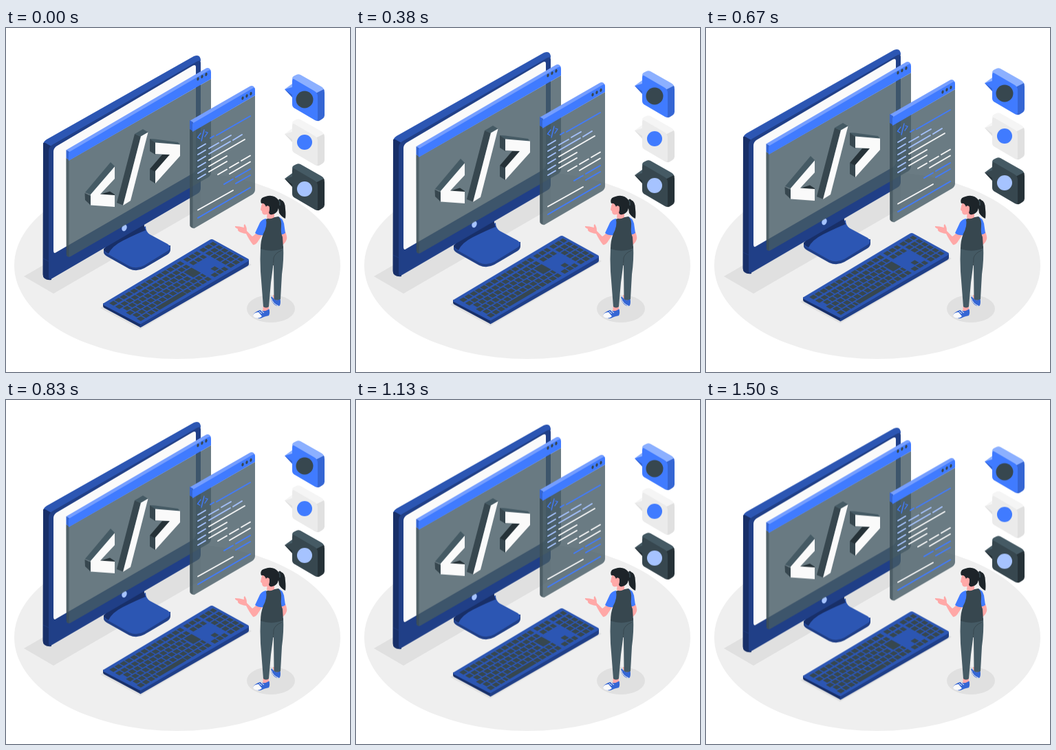
Animation of 500x500 px, one loop 1.54 s. Source, as an HTML page without scripts:

```html
<!DOCTYPE html>
<html lang="en">
<head>
<meta charset="utf-8">
<title>Floating workstation</title>
<style>
html, body { margin: 0; width: 100%; height: 100%; overflow: hidden; background: #fff; }
svg { display: block; width: 100%; height: 100%; }
.float { animation: float 1540ms linear infinite; }
@keyframes float {
  0%, 100% { transform: translateY(0); }
  46.8% { transform: translateY(-9.6px); }
  97% { transform: translateY(.4px); }
}
.lit { fill: #2c56b3; }
.front { fill: #203f87; }
.dark { fill: #182f68; }
.blue { fill: #407bff; }
.pale { fill: #759eff; }
.deep { fill: #3566d4; }
.white { fill: #fafafa; }
.slate { fill: #37474f; }
.steel { fill: #455a64; }
.ink { fill: #263238; }
.skin { fill: #ffa8a7; }
.glass { fill: #455a64; opacity: .8; }
.shade { fill: #e0e0e0; }
.line { fill: none; stroke-width: 1.9; stroke-linecap: round; }
.keys { fill: none; stroke: #37474f; stroke-width: 7; stroke-dasharray: 7 1.7; }
.blue-tag { --face: #407bff; --top: #8cb0ff; --side: #3566d4; }
.light-tag { --face: #ebebeb; --top: #f5f5f5; --side: #e0e0e0; }
.dark-tag { --face: #37474f; --top: #455a64; --side: #263238; }
</style>
</head>
<body>
<svg viewBox="0 0 500 500">
  <defs>
    <g id="tag">
      <path fill="var(--top)" d="M416 74Q416 71 418 70L422 68Q425 66.500 428 68L458 85Q462 87 462.500 91L453 100L418 80Z"/>
      <path fill="var(--side)" d="M450 95L462 89Q463 91 463 94V127Q463 130 460 132L456 134.500Q453 136 450 134Z"/>
      <path fill="var(--face)" d="M416 77Q416 73 419 74.500L449 92Q453 95 453 99V132Q453 136 449 134L420 117Q416 115 416 111Z"/>
      <path fill="var(--top)" d="M405 89L416 81V87Z"/>
      <path fill="var(--face)" d="M405 89L416 86V100Z"/>
      <path fill="var(--side)" d="M405 89L416 97V101Z"/>
    </g>
    <g id="dots" class="slate">
      <ellipse rx="1.600" ry="2.600" transform="rotate(15)"/>
      <ellipse cx="6" cy="-3.300" rx="1.600" ry="2.600" transform="rotate(15 6 -3.300)"/>
      <ellipse cx="12" cy="-6.600" rx="1.600" ry="2.600" transform="rotate(15 12 -6.600)"/>
    </g>
  </defs>

  <ellipse cx="249" cy="345" rx="237" ry="136" fill="#efefef"/>
  <path class="shade" d="M26 361L69 386L283 262V213Z"/>
  <ellipse class="shade" cx="385" cy="408" rx="35" ry="20"/>

  <g class="float">
    <!-- stand -->
    <path class="front" d="M142 321V326Q142 329 147 332L179 350Q190 355 201 349L235 329Q239 326 239 322V316Z"/>
    <path class="lit" d="M143 322L203 288Q203 296 209 300L235 314Q242 319 235 324L201 345Q190 351 179 346L147 328Q142 325 143 322Z"/>
    <path class="dark" d="M142 321L149 314L201 281Q200 289 203 294Q190 299 170 309Q154 317 149 328L147 327Q142 324 142 321Z"/>

    <!-- monitor -->
    <path class="lit" d="M54 170Q54 165 59 162L273 41Q283 37 283 48L62 176Z"/>
    <path class="dark" d="M54 168Q54 166 57 167L66 172V366Q60 367 56 364Q53.500 362 53.500 358Z"/>
    <path class="front" d="M62 179Q62 173 67 170L277 49Q283 45 283 51V233Q283 238 278 241L67 364Q62 367 62 361Z"/>
    <path class="white" d="M69 180Q69 175 73 172L271 55Q276 52 276 57V204Q276 208 272 211L73 326Q69 329 69 323Z"/>
    <path d="M54 335L62 339" stroke="#203f87" stroke-width=".7"/>
    <ellipse cx="172" cy="290.500" rx="3.500" ry="4.900" transform="rotate(22 172 290.500)" fill="#a6c3ff"/>

    <!-- large window -->
    <path class="glass" d="M87.500 189L92 192L298 74V210Q298 214 294 217L94 332Q91 334 88 331Z"/>
    <path class="slate" d="M87.500 189L91.500 191V333Q88 332 87.500 328Z" opacity=".5"/>
    <path class="pale" d="M88 177L290 59Q293 57 296 59L298 62L92 182Z"/>
    <path class="deep" d="M87.500 177L92 180V192L87.500 189Z"/>
    <path class="blue" d="M91 183Q91 180 94 179L294 62Q298 60 298 64V74L91 193Z"/>
    <use href="#dots" x="279" y="74"/>

    <!-- code sign -->
    <path class="steel" d="M115 239L152 195L158 201L123 242Z"/>
    <path class="slate" d="M114.500 240L123 244V257.500L115 250Z"/>
    <path class="ink" d="M136 242L151 237.500L158 242V245Z"/>
    <path class="white" d="M158 201.500V219L137 241.500L158 243V260L123 257.500V242Z"/>
    <path class="steel" d="M187 154L199 147L206.500 151.500L196 158Z"/>
    <path class="slate" d="M187 154L196 158L171 258L161 254Z"/>
    <path class="white" d="M196 157.500L206.500 151.500L181 251L170 258Z"/>
    <path class="steel" d="M209 161L217 161.500L250 166L253 170L217 168Z"/>
    <path class="slate" d="M209 161L217 167V184L209 179ZM209 205L217 208V226L209 221Z"/>
    <path class="ink" d="M209 205L227 184H238.500L217 209Z"/>
    <path class="white" d="M217 166.500L253 169.500V186L217 226V208L238 184L217 183Z"/>

    <!-- code window -->
    <path class="glass" d="M267 146L272 150L362 98V235Q362 239 358 242L274 291Q271 292 267.500 288Z"/>
    <path class="slate" d="M267 146L271.500 149V291Q267.500 290 267 286Z" opacity=".5"/>
    <path class="pale" d="M267 135L354 85Q357 83 360 85L362 88L272 140Z"/>
    <path class="deep" d="M267 134L272 137V150L267 147Z"/>
    <path class="blue" d="M271 141Q271 138 274 137L358 88Q362 85 362 90V98L271 151Z"/>
    <use href="#dots" x="344" y="102"/>
    <g class="line">
      <path stroke="#407bff" stroke-width="1.300" d="M283 153L278.500 159L282 161M288 148L284 164M290 151L293 152L289 158"/>
      <path stroke="#407bff" d="M297 160L302 157M306 156L355 128M317 227L330 219.500M334 217L355 205M334 226L355 214M279 276L355 232"/>
      <path stroke="#a6c3ff" d="M279 175L290 168.500M279 184L290 177.500M279 193L290 186.500M279 202L290 195.500M279 211L290 204.500M279 219L290 212.500M295 175L309 167M313 164L327 156M295 183L326 165M330 163L343 155"/>
      <path stroke="#fafafa" d="M295 192L347 162M295 201L321 186M295 209L321 194M308 213L321 205.500M325 203L338 195.500M342 193L355 185.500M325 212L355 194.500M279 264.500L330 236"/>
    </g>

    <!-- keyboard -->
    <path class="shade" d="M137 407L195 438L357 344L300 313Z"/>
    <path class="dark" d="M141 400L196 430V435.500L143 407Q141 406 141 404Z"/>
    <path class="front" d="M195 430L353 337V343Q353 345 351 346L198 434Q196 435.500 194 434.500Z"/>
    <path class="lit" d="M142 400L296 308Q299 306 302 308L352 335.500Q354 337 352 339L198 429Q195 431 192 429L142 403Q140 401.500 142 400Z"/>
    <g class="keys" transform="matrix(.866 -.513 .866 .487 141 401)">
      <path d="M6 8H125M6 18H125M10 27H110M6 36H110M8 45H125M6 54H36M84 54H125"/>
      <path d="M37.500 54H83" stroke-dasharray="none"/>
      <path d="M112 31.500H125" stroke-width="16" stroke-dasharray="none"/>
      <path d="M130 8H153M130 18H153M139 45H146M130 54H153"/>
      <path d="M157 8H180M157 18H180M157 27H180M157 36H180M157 45H180M157 54H180"/>
    </g>

    <!-- bubbles -->
    <use href="#tag" class="blue-tag"/>
    <use href="#tag" class="light-tag" y="65"/>
    <use href="#tag" class="dark-tag" y="130"/>
    <circle class="slate" cx="434" cy="104" r="12.500"/>
    <circle class="blue" cx="434" cy="166" r="11"/>
    <circle cx="434" cy="234" r="11" fill="#a6c3ff"/>
  </g>

  <!-- person -->
  <path class="skin" d="M388 388L397 389L398 399L389 397ZM374 402H382V413H373Z"/>
  <path class="deep" d="M386 390Q384 394 387 398Q391 405 397 404Q400 402 398.500 393Q393 399 386 390Z"/>
  <path d="M385.500 393Q388 401 396 404" fill="none" stroke="#fafafa" stroke-width="1"/>
  <path class="deep" d="M359 417Q361 413 369 410Q376 413 382.500 408.500Q384 414 382 418Q376 419 370 422Q361 423 359 417Z"/>
  <path class="white" d="M359 417Q361 413.500 367 413L372 419Q369 422 365 422Q359 421 359 417Z"/>
  <path d="M368 412L372 415M371 411L375 414" stroke="#fafafa" stroke-width="1"/>
  <path class="steel" d="M370 319L403 317Q404 337 401 358L399 394Q394 397 389.500 394L389 340L385 370L382 405Q378 408 374 405L370 354Q369 336 370 319Z"/>
  <path d="M401 323Q391 327 389 334L388.500 345" fill="none" stroke="#37474f"/>
  <path class="skin" d="M364 298Q360 302 358 303L350 295Q350 289 347 285Q345 286 346 290Q339 288 333 288Q332 290 337 292Q336 295 341 297Q346 299 349 299Q354 309 359 315Q362 316 365 312L373 300Z"/>
  <path class="skin" d="M398 298L406 296Q409 304 408 307Q406 313 401 316L400 306Z"/>
  <path class="blue" d="M378 277Q372 278 369 283L362 298Q367 302 375 301L381 284ZM395 274Q402 276 404 284L406 298Q402 301 397 300Z"/>
  <path class="slate" d="M380 277L396 274Q401 278 400 289Q399 297 402 304L403 320Q387 327 370 321Q370 309 374 299Q380 288 378 278Z"/>
  <path class="skin" d="M380 266L390 264L390 275Q384 279 379 276Z"/>
  <path class="skin" d="M373 252Q371 258 370 264Q371 266 372 266Q372 271 376 271.500Q382 271 385 266L386 252Z"/>
  <path d="M371 255Q368 247 377 245Q389 241 396 250Q398 247 400 250Q406 252 406 263Q407 271 406 277Q401 275 397 269L396 262Q394 270 387 271Q383 272 382 268Q384 263 382 259Q379 257 378 260Q376 254 371 255Z" fill="#1d2429"/>
  <path class="skin" d="M379 260Q382 257 383 261Q383 266 379 266Z"/>
  <path d="M396 250Q399 252 398 258" fill="none" stroke="#455a64" stroke-width="1"/>
</svg>
</body>
</html>
```
